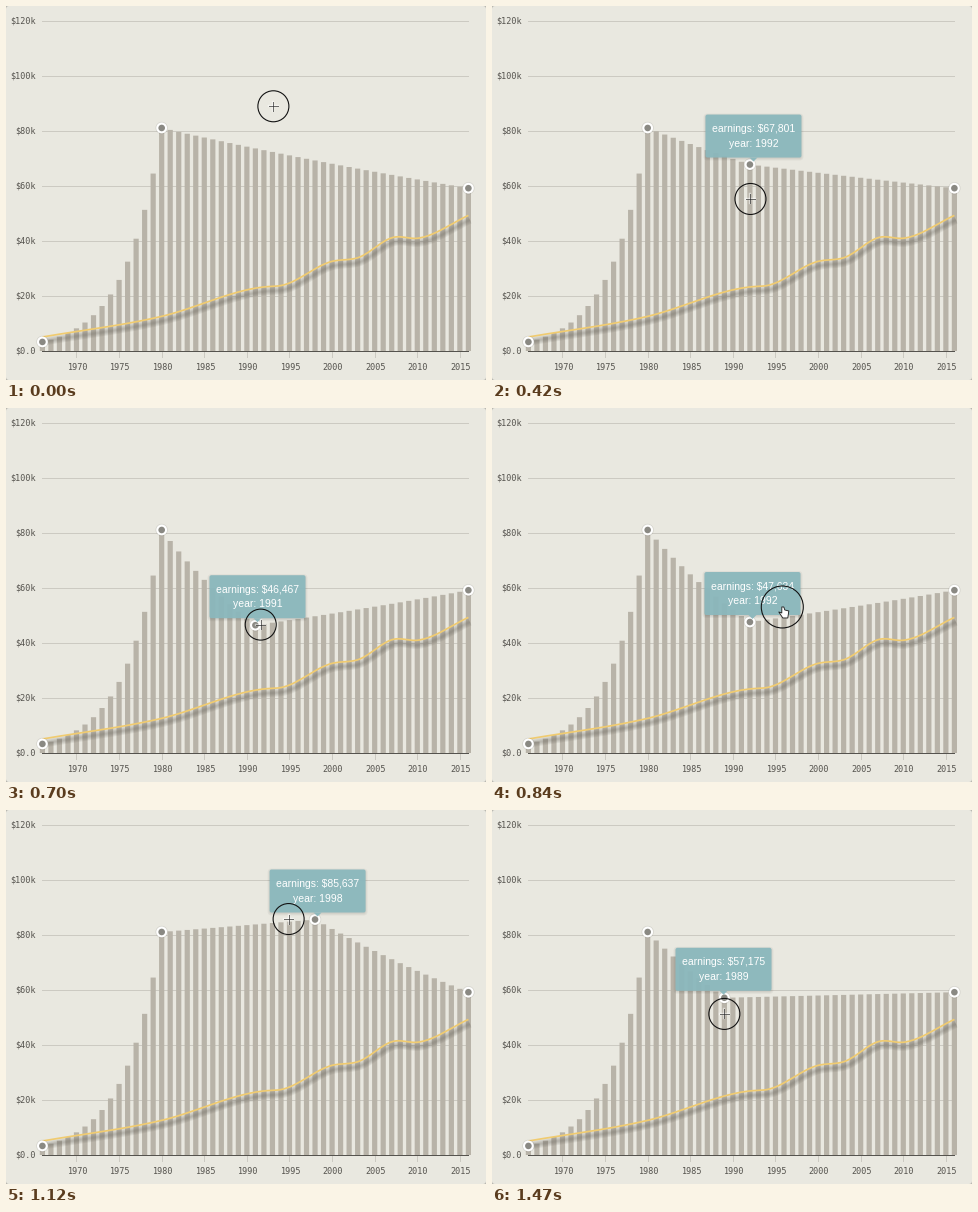
These frames come from a looping animation (480 by 374 pixels, 1540 ms). A matplotlib script:

```python
import numpy as np
import matplotlib.pyplot as plt
from matplotlib.animation import FuncAnimation
from matplotlib.patches import Circle, FancyBboxPatch, Polygon, Rectangle

W, H, DPI = 480, 374, 100
FRAMES, INTERVAL = 22, 70
PX = 72 / DPI  # points per pixel

PAPER, GRID, INK = "#e9e8e0", "#cccac2", "#55534e"
BAR, DOT, GOLD, TEAL = "#b8b3a8", "#8a8983", "#f0cb70", "#8bb8bd"

START, PEAK, END = (1966, 3300), (1980, 81100), (2016, 59200)
YEARS = np.arange(1966, 2017)

# The chart trails the pointer by this many frames.
LAG = 1.5

# Turning points of the drag: frame, year, earnings
DRAG = [
    (1, 1993.1, 88800), (3, 1993.1, 88407), (4.5, 1992.8, 80000),
    (8, 1992, 52389), (12, 1992.3, 47634), (13.5, 1995.8, 53100),
    (16, 1998.3, 85637), (17.5, 1994.9, 85800), (19, 1991.2, 76065),
    (21, 1988.9, 57175), (22.5, 1989, 51300)]

# Bends of the wage line: year, wage
WAGES = [
    (1966, 5100), (1980, 12600), (1992, 23300), (1994, 23800), (2000, 32600),
    (2003, 33900), (2007.3, 41400), (2010, 41000), (2016, 49300)]


def x_of(year):
    return 36.4 + (year - 1966) * 8.52


def y_of(value):
    return 345 - value * 55 / 20000


def glide(keys, t):
    """Smooth curve through rows of (position, a, b, ...)."""
    times, *columns = np.array(keys).T
    i = np.clip(np.searchsorted(times, t, "right") - 1, 0, len(times) - 2)
    span = times[i + 1] - times[i]
    s = (t - times[i]) / span
    curves = []
    for c in columns:
        slope = np.gradient(c, times)
        curves.append((2 * s**3 - 3 * s**2 + 1) * c[i]
                      + (s**3 - 2 * s**2 + s) * span * slope[i]
                      + (3 * s**2 - 2 * s**3) * c[i + 1]
                      + (s**3 - s**2) * span * slope[i + 1])
    return curves


def growth(points):
    """Constant yearly growth between the handles."""
    years, values = np.array(points).T
    return np.exp(np.interp(YEARS, years, np.log(values)))


fig = plt.figure(figsize=(W / DPI, H / DPI), dpi=DPI, facecolor="#b9b8b1")
ax = fig.add_axes([0, 0, 1, 1])
ax.set_xlim(0, W)
ax.set_ylim(H, 0)
ax.axis("off")


def line(xs, ys, color, width, z, **kw):
    return ax.plot(xs, ys, color=color, lw=width * PX, zorder=z, **kw)[0]


def label(x, y, text, ha):
    ax.text(x, y, text, ha=ha, va="baseline", color=INK, zorder=2,
            family="DejaVu Sans Mono", size=8.5 * PX)


def rounded(w, h, r, **kw):
    style = f"round,pad=0,rounding_size={r}"
    return ax.add_patch(FancyBboxPatch((0, 0), w, h, boxstyle=style, lw=0, **kw))


def handle(year, value):
    center = x_of(year), y_of(value)
    return [ax.add_patch(Circle(center, r, fc=color, alpha=alpha, lw=0, zorder=z))
            for r, color, alpha, z in ((6.2, "black", 0.08, 7),
                                       (5.4, "white", 1, 8),
                                       (3.3, DOT, 1, 9))]


# Grid and labels
rounded(W, H, 3, fc=PAPER, zorder=0)
for k in range(7):
    y = y_of(20000 * k)
    if k:
        line([36, 462], [y, y], GRID, 1, 1)
    label(30, y + 2.4, f"${20 * k}k" if k else "$0.0", "right")
for year in range(1970, 2016, 5):
    x = x_of(year)
    line([x, x], [346, 351], GRID, 1, 1)
    label(x + 0.6, 364.2, str(year), "center")

# Bars and wage line
bars = [ax.add_patch(Rectangle((x_of(y) - 2.6, 345), 5.2, 0, fc=BAR, lw=0,
                               zorder=3, snap=False)) for y in YEARS]
line([36, 462], [345, 345], INK, 1, 4)

span = np.linspace(1966, 2016, 200)
wx, wy = x_of(span), y_of(glide(WAGES, span)[0])
for width in (2, 4, 6, 8):
    line(wx + 1.5, wy + 4.5, "#55524a", width, 5, alpha=0.09,
         solid_capstyle="butt")
line(wx, wy, GOLD, 1.7, 6, solid_capstyle="butt")

for point in (START, PEAK, END):
    handle(*point)
moving = handle(*PEAK)

# Tooltip
TIP_W, TIP_H = 96, 43
shades = [rounded(TIP_W + 2 * g, TIP_H + 2 * g, 2 + g, fc="black",
                  alpha=0.04, zorder=10) for g in range(3)]
tip = rounded(TIP_W, TIP_H, 2, fc=TEAL, alpha=0.95, zorder=11)
caret = ax.add_patch(Polygon([(0, 0)] * 3, fc=TEAL, alpha=0.95, lw=0, zorder=11))
rows = [ax.text(0, 0, "", ha="center", va="baseline", color="white", zorder=12,
                family="Liberation Sans", size=10.4 * PX) for _ in range(2)]
dragged = moving + shades + [tip, caret] + rows

# Pointer
ring = ax.add_patch(Circle((0, 0), 15.5, fill=False, ec="#111111",
                           lw=1.1 * PX, zorder=15))
halo = [line([], [], "white", 2.4, 13, alpha=0.5) for _ in range(2)]
cross = [line([], [], "#222222", 1, 14, alpha=0.65) for _ in range(2)]
HAND = np.array([(-2, -5), (0, -5), (1, -2), (5, -1), (4, 6), (-1, 6),
                 (-5, 0), (-2, 1)])
hand = ax.add_patch(Polygon(HAND, fc="white", ec="#222222", lw=0.9 * PX,
                            joinstyle="round", zorder=14))


def place_tip(year, value):
    snapped = round(year)
    y = y_of(value)
    for part in moving:
        part.center = (x_of(snapped), y)
    cx, bottom = x_of(year), y - 7
    left, top = cx - TIP_W / 2, bottom - TIP_H
    tip.set_x(left)
    tip.set_y(top)
    for g, shade in enumerate(shades):
        shade.set_x(left - g)
        shade.set_y(top - g + 1)
    caret.set_xy([(cx - 4, bottom), (cx + 4, bottom), (cx, bottom + 4)])
    rows[0].set_text(rf"earnings: \${value:,.0f}")
    rows[1].set_text(f"year: {snapped}")
    for row, dy in zip(rows, (17.5, 32.2)):
        row.set_position((cx, top + dy))


def place_pointer(i):
    year, value = glide(DRAG, i + LAG)
    x, y = x_of(year), y_of(value)
    release = max(0, 1 - abs(i - 12) / 2)
    ring.center = (x, y)
    ring.radius = 15.5 + 5.5 * release
    hand.set_visible(release > 0)
    hand.set_xy(HAND + (x + 1.5, y + 5))
    for horizontal, vertical in (halo, cross):
        horizontal.set_data([x - 4.5, x + 4.5], [y, y])
        vertical.set_data([x, x], [y - 4.5, y + 4.5])
    for stroke in halo + cross:
        stroke.set_visible(release == 0)


def draw(i):
    points = [START, PEAK, END]
    for part in dragged:
        part.set_visible(i > 0)
    if i > 0:
        year, value = glide(DRAG, i)
        points.insert(2, (round(year), value))
        place_tip(year, value)
    for bar, value in zip(bars, growth(points)):
        top = y_of(value)
        bar.set_y(top)
        bar.set_height(345 - top)
    place_pointer(i)
    return []


anim = FuncAnimation(fig, draw, frames=FRAMES, interval=INTERVAL,
                     repeat=True, repeat_delay=0, blit=False)
plt.show()
```
